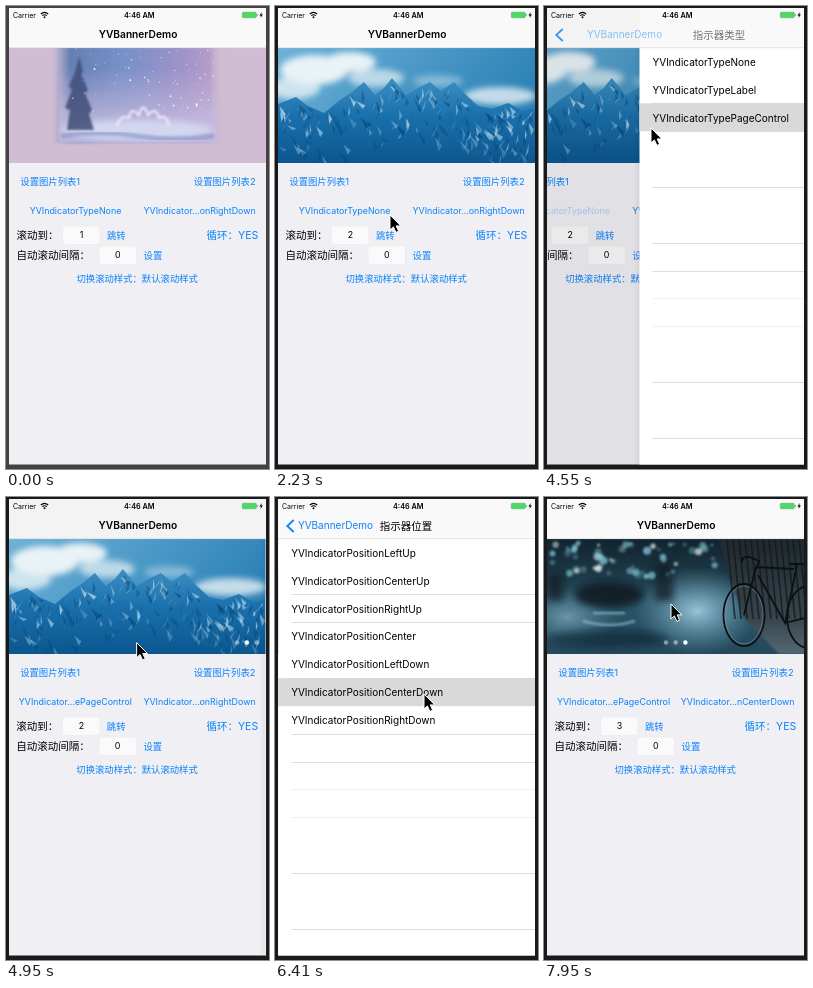
Write an HTML page that moves like this. It is 263 by 463 pixels and loops after 8 s.

```html
<!DOCTYPE html>
<html lang="zh-CN">
<head>
<meta charset="utf-8">
<style>
html, body { margin: 0; width: 100%; height: 100%; overflow: hidden; background: #1b1a1b; }
svg { display: block; width: 100%; height: 100%; }
text { font-family: Inter, "Noto Sans CJK SC", "Noto Sans CJK", sans-serif; white-space: pre; }
.blue { fill: #0c82fb; }
.button { font-size: 9.35px; }
.latin { font-size: 8.9px; }
.label { font-size: 10.5px; }
.cell { font-size: 10px; }
.title { font-size: 10.2px; font-weight: 600; }
.mid { text-anchor: middle; }
.end { text-anchor: end; }
</style>
</head>
<body>
<svg viewBox="0 0 263 463" preserveAspectRatio="none">
  <defs>
    <clipPath id="screen"><rect x="3" y="2" width="257" height="456.5"/></clipPath>
    <clipPath id="bannerBox"><rect width="257.2" height="115"/></clipPath>
    <linearGradient id="winter">
      <stop offset="0" stop-color="#7189b8" stop-opacity="0"/>
      <stop offset=".1" stop-color="#647fb3"/>
      <stop offset=".4" stop-color="#7791c8"/>
      <stop offset=".75" stop-color="#9c93c9"/>
      <stop offset=".92" stop-color="#b29cc9"/>
      <stop offset="1" stop-color="#d0bdd3" stop-opacity="0"/>
    </linearGradient>
    <linearGradient id="haze" x2="0" y2="1">
      <stop offset=".25" stop-color="#c9b5d8" stop-opacity="0"/>
      <stop offset=".8" stop-color="#c6bce0" stop-opacity=".85"/>
    </linearGradient>
    <linearGradient id="sky" x2="1" y2=".4">
      <stop offset="0" stop-color="#6db2d8"/>
      <stop offset="1" stop-color="#2b80b6"/>
    </linearGradient>
    <linearGradient id="rock" x2="0" y2="1">
      <stop offset="0" stop-color="#3c8fc2"/>
      <stop offset=".45" stop-color="#1a70ac"/>
      <stop offset="1" stop-color="#0b568f"/>
    </linearGradient>
    <linearGradient id="street" x2="0" y2="1">
      <stop offset="0" stop-color="#10242f"/>
      <stop offset=".35" stop-color="#1e3c4a"/>
      <stop offset=".55" stop-color="#2b5568"/>
      <stop offset="1" stop-color="#24495b"/>
    </linearGradient>
    <radialGradient id="glow">
      <stop offset="0" stop-color="#9cc9dc" stop-opacity=".95"/>
      <stop offset="1" stop-color="#6aa0b8" stop-opacity="0"/>
    </radialGradient>
    <linearGradient id="wall" x2="0" y2="1">
      <stop offset="0" stop-color="#20282d"/>
      <stop offset=".7" stop-color="#39464d"/>
      <stop offset="1" stop-color="#536974"/>
    </linearGradient>
    <linearGradient id="edge">
      <stop offset="0" stop-opacity="0"/>
      <stop offset="1" stop-opacity=".06"/>
    </linearGradient>
    <filter id="soft"><feGaussianBlur stdDeviation="1.1"/></filter>
    <filter id="cloudy" x="-30%" y="-30%" width="160%" height="160%"><feGaussianBlur stdDeviation="3"/></filter>
    <filter id="crisp"><feGaussianBlur stdDeviation=".4"/></filter>
  </defs>

  <rect id="border" width="263" height="463"/>
  <g clip-path="url(#screen)">
    <rect x="3" y="2" width="257" height="458" fill="#efeff4"/>

    <g id="home">
      <g transform="translate(3 42)" clip-path="url(#bannerBox)">
        <g id="slides">
          <g id="slide0" clip-path="url(#bannerBox)">
            <rect width="258" height="115" fill="#d0bdd3"/>
            <rect x="44" y="-5" width="170" height="100" fill="url(#winter)" filter="url(#soft)"/>
            <rect x="50" y="-5" width="158" height="100" fill="url(#haze)" filter="url(#soft)"/>
            <ellipse cx="128" cy="82" rx="76" ry="10" fill="#d3d7ee" filter="url(#cloudy)"/>
            <path d="M70 8 74 24 72 26 79 42 76 45 83 62 80 66 85 82H58L61 62 56 60 63 42 60 38 66 24Z" fill="#3f4d78" opacity=".85" filter="url(#soft)"/>
            <path d="M52 88Q90 82 128 88T205 88" fill="none" stroke="#8294c8" stroke-width="5" opacity=".6" filter="url(#soft)"/>
            <path d="M108 78Q112 66 120 70 122 58 130 67 134 52 139 67 147 58 150 70 158 66 160 78" fill="none" stroke="#f3eefa" stroke-width="2.5" opacity=".8" filter="url(#soft)"/>
          </g>
          <g transform="translate(257)"><g id="slide1" clip-path="url(#bannerBox)">
            <rect width="258" height="115" fill="url(#sky)"/>
            <g fill="#e9f2f6" filter="url(#cloudy)">
              <ellipse cx="36" cy="22" rx="34" ry="15"/>
              <ellipse cx="72" cy="14" rx="26" ry="10"/>
              <ellipse cx="16" cy="40" rx="26" ry="11" opacity=".8"/>
              <ellipse cx="98" cy="30" rx="28" ry="9" opacity=".7"/>
              <ellipse cx="222" cy="48" rx="36" ry="9" opacity=".8"/>
              <ellipse cx="160" cy="33" rx="25" ry="6" opacity=".4"/>
            </g>
          </g></g>
          <g transform="translate(514)"><g id="slide2" clip-path="url(#bannerBox)">
            <rect width="257" height="115" fill="url(#street)"/>
            <ellipse cx="150" cy="72" rx="62" ry="44" fill="url(#glow)"/>
            <ellipse cx="20" cy="78" rx="52" ry="30" fill="url(#glow)" opacity=".6"/>
            <g fill="#0c1a23" filter="url(#cloudy)">
              <ellipse cx="62" cy="56" rx="34" ry="13" opacity=".85"/>
              <rect x="108" y="22" width="18" height="40" opacity=".7"/>
              <rect x="0" y="34" width="16" height="28" opacity=".7"/>
              <ellipse cx="62" cy="100" rx="60" ry="9" opacity=".45"/>
            </g>
            <path d="M36 82Q62 90 88 82M46 74H78" fill="none" stroke="#9ccbdc" stroke-width="2.5" opacity=".6" filter="url(#soft)"/>
            <g id="lights" filter="url(#soft)"></g>
            <path d="M172 0H258V115H232L196 78Z" fill="url(#wall)" filter="url(#soft)"/>
            <g id="panels" stroke="#12181c" stroke-width="1.8" opacity=".7"></g>
            <g fill="none" stroke="#0b1014" stroke-width="1.8">
              <ellipse cx="197" cy="76" rx="20.5" ry="31"/>
              <ellipse cx="197" cy="76" rx="19" ry="29" stroke="#8b9ba2" stroke-width=".5"/>
              <ellipse cx="262" cy="78" rx="22" ry="31"/>
              <path d="M197 76 209 28 247 30M211 36 238 84 250 26M238 84 262 78M195 24Q194 17 202 18L212 22 209 30M243 25H257"/>
            </g>
          </g></g>
        </g>
        <g id="dots" fill="#fff">
          <circle cx="-9.7" cy="103.5" r="2.2"/><circle cy="103.5" r="2.2"/><circle cx="9.7" cy="103.5" r="2.2"/>
        </g>
      </g>

      <text class="blue button" x="14.3" y="179.3">设置图片列表1</text>
      <text class="blue button end" x="249.6" y="179.3">设置图片列表2</text>
      <text class="blue latin mid" id="typeOld" x="69.5" y="208.3">YVIndicatorTypeNone</text>
      <text class="blue latin mid" id="typeNew" x="69.5" y="208.3">YVIndicator…ePageControl</text>
      <text class="blue latin mid" id="placeOld" x="193.7" y="208.3">YVIndicator…onRightDown</text>
      <text class="blue latin mid" id="placeNew" x="193.7" y="208.3">YVIndicator…nCenterDown</text>
      <text class="label" x="10.4" y="233">滚动到：</text>
      <text class="label" x="10.4" y="253">自动滚动间隔：</text>
      <g fill="#fafafa" stroke="#e6e6ea" stroke-width=".5">
        <rect x="56.5" y="220" width="37.5" height="18.5" rx="3"/>
        <rect x="93" y="240" width="37.5" height="18.5" rx="3"/>
      </g>
      <text class="latin mid" id="page" x="75.5" y="232.3">1</text>
      <text class="latin mid" x="111.8" y="252.3">0</text>
      <text class="blue button" x="101" y="232.6">跳转</text>
      <text class="blue button" x="137.6" y="252.6">设置</text>
      <text class="blue label" x="200.6" y="233">循环：YES</text>
      <text class="blue button mid" x="131.2" y="275.8">切换滚动样式：默认滚动样式</text>
      <rect id="dim" x="3" y="42" width="350" height="420"/>
    </g>

    <g id="list">
      <rect x="-3" y="42" width="6" height="420" fill="url(#edge)"/>
      <rect x="3" y="42" width="258" height="420" fill="#fff"/>
      <rect id="chosen" x="3" width="258" height="28" fill="#d9d9d9"/>
      <g id="rules" fill="#d6d6d9"></g>
      <g id="types"></g>
      <g id="places"></g>
    </g>

    <rect x="3" y="2" width="257" height="40" fill="#f9f9f9"/>
    <rect id="barTint" x="3" y="2" height="40" opacity=".025"/>
    <rect x="3" y="41.6" width="257" height=".5" fill="#c9c9cb"/>
    <text x="7" y="11.6" font-size="7">Carrier</text>
    <g fill="none" stroke="#000" stroke-width="1.1">
      <path d="M34.8 8Q38.5 4.6 42.2 8M36.3 9.7Q38.5 7.8 40.7 9.7"/>
      <circle cx="38.5" cy="11.2" r=".4"/>
    </g>
    <text class="mid" x="133.3" y="11.6" font-size="7.3" font-weight="600">4:46 AM</text>
    <rect x="236.3" y="6.2" width="14" height="5.6" rx="1" fill="#4cd964" stroke="#53a562" stroke-width=".5"/>
    <path d="M251.2 8V10.2" stroke="#53a562"/>
    <path d="M255.7 6 253.4 9.4H255L254.5 12 256.9 8.6H255.3Z"/>
    <path id="chevron" d="M18.7 23 12.3 29 18.7 35" fill="none" stroke="#0c82fb" stroke-width="1.8"/>
    <text class="title mid" id="homeTitle" y="32.4">YVBannerDemo</text>
    <text class="blue mid" id="back" y="32.4" font-size="10">YVBannerDemo</text>
    <text class="label mid" id="listTitle" y="32.6" font-weight="500"></text>
  </g>
  <path id="cursor" d="M0 0V15L3.4 11.9 5.9 17.4 8.6 16.2 6.2 10.9H10.8Z" stroke="#fff" stroke-width="1"/>
</svg>

<script>
const LOOP = 8000, WIDTH = 257;
const $ = id => document.getElementById(id);
const clamp = v => Math.min(1, Math.max(0, v));
const fade = (t, from, to) => clamp((t - from) / (to - from));
const move = (id, x, y = 0) => $(id).setAttribute('transform', `translate(${x} ${y})`);
const alpha = (id, v) => $(id).setAttribute('opacity', clamp(v));

function add(parent, tag, attrs, text = '') {
  const el = document.createElementNS('http://www.w3.org/2000/svg', tag);
  for (const key in attrs) el.setAttribute(key, attrs[key]);
  el.textContent = text;
  $(parent).appendChild(el);
}

let seed = 7;
const rand = (lo, hi) => {
  seed = (seed * 16807) % 2147483647;
  return lo + (hi - lo) * seed / 2147483647;
};

function buildSlides() {
  for (let i = 0; i < 75; i++) {
    add('slide0', 'circle', { cx: rand(56, 205), cy: rand(1, 65), r: rand(.3, 1), fill: '#fff', opacity: rand(.3, .9) });
  }

  const ridge = [[0, 56], [18, 49], [30, 58], [46, 65], [62, 52], [74, 44], [86, 34], [97, 47], [106, 40], [114, 30],
    [128, 47], [140, 40], [152, 34], [163, 43], [176, 34], [187, 46], [200, 58], [214, 61], [230, 55], [245, 63], [257, 60]];
  add('slide1', 'path', { d: `M${ridge.join('L')}L258 115H0Z`, fill: 'url(#rock)' });
  add('slide1', 'g', { id: 'facets', filter: 'url(#crisp)' });
  const heightAt = x => {
    const i = ridge.findIndex(p => p[0] > x), [a, b] = [ridge[i - 1], ridge[i]];
    return a[1] + (b[1] - a[1]) * (x - a[0]) / (b[0] - a[0]);
  };
  // Lit and shaded slabs run down the slopes, paler near the ridge.
  for (let i = 0; i < 260; i++) {
    const x = rand(0, 256), depth = rand(0, 1) ** 1.4, y = heightAt(x) + 2 + depth * 52;
    const lean = rand(-7, 7), drop = rand(5, 14), lit = i % 2;
    add('facets', 'path', {
      d: `M${x} ${y}l${lean} ${drop} ${rand(1, 4)} ${-drop * .4}Z`,
      fill: lit ? '#b5d8ea' : '#084a80', opacity: lit ? rand(.3, .85) * (1 - depth * .6) : rand(.3, .7)
    });
  }

  for (let i = 0; i < 55; i++) {
    add('lights', 'circle', {
      cx: rand(2, 170), cy: rand(3, 38), r: rand(1.4, 4),
      fill: i % 4 ? '#7fbfd3' : '#e9f3f0', opacity: rand(.25, .85)
    });
  }
  for (let x = 180; x < 258; x += 6) add('panels', 'path', { d: `M${x} 0L${x + 8} 80` });
}

function buildLists() {
  for (const y of [97, 125, 181, 237, 265, 376, 432]) add('rules', 'rect', { x: 16, y, width: 245, height: .8 });
  for (const y of [292, 320]) add('rules', 'rect', { x: 16, y, width: 245, height: .35 });
  const fill = (id, prefix, names) => names.split(' ').forEach((name, i) =>
    add(id, 'text', { class: 'cell', x: 16, y: 59.7 + 27.9 * i }, prefix + name));
  fill('types', 'YVIndicatorType', 'None Label PageControl');
  fill('places', 'YVIndicatorPosition', 'LeftUp CenterUp RightUp Center LeftDown CenterDown RightDown');
}

// Critically damped spring used by the navigation transitions.
function spring(ms) {
  const x = Math.max(0, ms) * .0183;
  return 1 - (1 + x) * Math.exp(-x);
}
const PUSH = [3457, 5592], POP = [4482, 6409];
const shown = t => PUSH.reduce((sum, start, i) => sum + spring(t - start) - spring(t - POP[i]), 0);

// Smooth interpolation through [time, ...values] points.
function track(points, t) {
  let i = points.findIndex(p => p[0] > t);
  if (i === 0) return points[0].slice(1);
  if (i < 0) return points[points.length - 1].slice(1);
  const [a, b] = [points[i - 1], points[i]];
  const u = fade(t, a[0], b[0]), k = u * u * (3 - 2 * u);
  return a.slice(1).map((v, j) => v + (b[j + 1] - v) * k);
}

const POINTER = [
  [580, 103, 24], [750, 118, 191], [940, 118, 191], [1100, 168, 124], [1380, 168, 124],
  [1740, 72, 140], [1880, 72, 140], [2230, 115, 209], [2400, 102, 204], [2750, 177, 204],
  [2940, 177, 204], [3220, 90, 206], [3800, 90, 206], [4140, 107, 122], [4750, 107, 122],
  [5300, 185, 200], [5850, 185, 200], [6180, 149, 197], [6480, 149, 197], [6940, 220, 112],
  [7150, 220, 112], [7400, 157, 112], [7900, 157, 112], [7950, 127, 107]
];

function scrolled(t) {
  const swipe = (start, drag, end) => {
    const pull = fade(t, start, drag), glide = fade(t, drag, end);
    return .32 * pull * pull + .68 * (1 - (1 - glide) ** 3);
  };
  return swipe(1380, 1700, 2180) + swipe(7150, 7370, 7710);
}

function renderBar(t) {
  const q = shown(t - 12), r = 1 - q;
  const popping = POP.some((p, i) => t >= p && t < (PUSH[i + 1] || LOOP));
  $('homeTitle').setAttribute('x', 60.5 + 71.5 * r);
  $('back').setAttribute('x', 60.5 + 71.5 * r);
  $('listTitle').setAttribute('x', 131 + 157 * r);
  $('listTitle').textContent = t < 5400 ? '指示器类型' : '指示器位置';
  alpha('homeTitle', popping ? (r - .6) / .4 : 1 - q * 1.35);
  alpha('back', popping ? 1 - r * 1.9 : (q - .65) / .25);
  alpha('chevron', popping ? 1.15 - r * 1.2 : q ** 12);
  alpha('listTitle', popping ? 1 - r * 1.7 : q);
}

function render(t) {
  const p = shown(t), page = scrolled(t), first = t < 5400;
  $('border').setAttribute('fill', t < 390 ? '#444142' : '#1b1a1b');

  move('home', -77 * p);
  alpha('dim', .1 * p);
  move('list', WIDTH * (1 - p));
  alpha('list', p > .0005 ? 1 : 0);
  $('barTint').setAttribute('width', p > .0005 ? WIDTH * (1 - p) : 0);
  alpha('types', first ? 1 : 0);
  alpha('places', first ? 0 : 1);
  $('chosen').setAttribute('y', first ? 97.3 : 181.2);
  alpha('chosen', t >= POP[first ? 0 : 1] ? 1 : 0);
  renderBar(t);

  move('slides', -WIDTH * page);
  const current = t < 2120 ? 0 : t < 7660 ? 1 : 2;
  $('page').textContent = current + 1;
  alpha('dots', t >= POP[0] ? 1 : 0);
  move('dots', t < POP[1] ? 238 : 128.7);
  [...$('dots').children].forEach((dot, i) => dot.setAttribute('opacity', i === current ? 1 : .45));

  const pressed = (start, end) => t < start ? 1 : .3 + .7 * fade(t, start, end);
  alpha('typeOld', t < POP[0] ? pressed(3430, 3640) : .5 * (1 - fade(t, 4482, 4640)));
  alpha('typeNew', fade(t, 4560, 4740));
  alpha('placeOld', t < POP[1] ? pressed(5580, 5950) : .5 * (1 - fade(t, 6405, 6560)));
  alpha('placeNew', fade(t, 6480, 6660));

  move('cursor', ...track(POINTER, t));
  alpha('cursor', t < 390 ? 0 : 1);
}

buildSlides();
buildLists();
const began = performance.now();
function tick() {
  render((performance.now() - began) % LOOP);
  requestAnimationFrame(tick);
}
tick();
</script>
</body>
</html>
```
